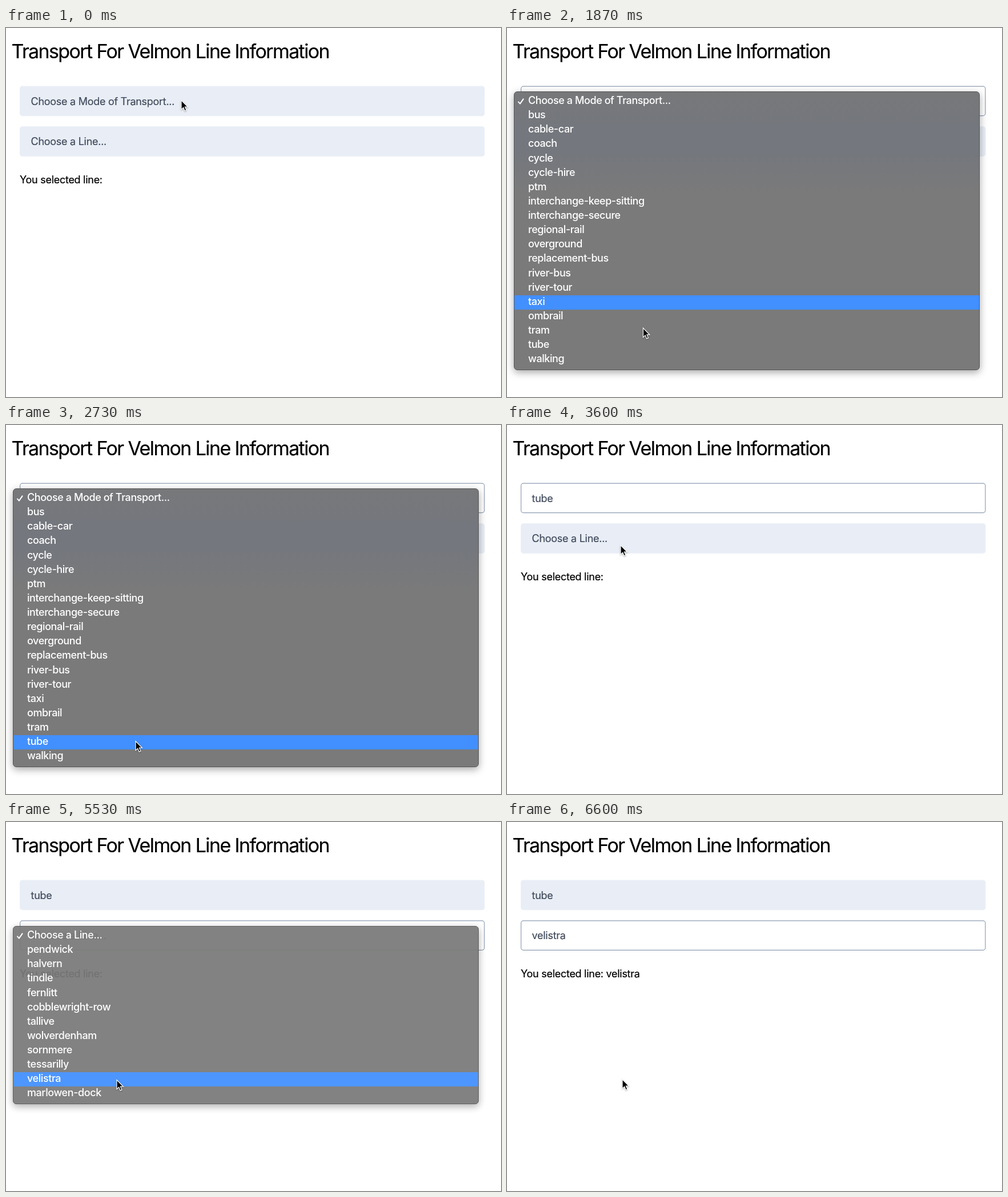
These frames come from a looping animation (867 by 646 pixels, 6670 ms). An HTML page:

```html
<!DOCTYPE html>
<html lang="en">
<head>
<meta charset="utf-8">
<title>Line Information</title>
<style>
  html, body { margin: 0; width: 100%; height: 100%; overflow: hidden; background: #fff; }
  body {
    position: relative;
    font: 400 18px Inter, Roboto, sans-serif;
    font-optical-sizing: none;
    letter-spacing: -.28px;
    -webkit-text-stroke: .2px;
    color: #000;
  }
  h1, p, .field, .menu, #boxes, #cursor { position: absolute; margin: 0; box-sizing: border-box; white-space: pre; }
  h1 { left: 9.5px; top: 21px; font-size: 34px; line-height: 40px; font-weight: 400; letter-spacing: -1.62px; }
  p { left: 24px; top: 254px; line-height: 24px; }
  #boxes { left: 0; top: 0; }
  #boxes rect { fill: #e9eef6; stroke: #e9eef6; stroke-width: 1.17; }
  #boxes .focus { fill: #fff; stroke: #8f9db3; }
  .field { left: 43.6px; line-height: 53px; color: #414a5c; }
  #mode { top: 101.5px; }
  #line { top: 172.3px; }
  .menu {
    left: 12px; width: 816px; padding: 4px 0;
    border: 1px solid #555; border-radius: 6px;
    box-shadow: 0 4px 14px rgba(0, 0, 0, .35);
    background: #7a7a7a; color: #fff; font-weight: 500; letter-spacing: -.43px;
    -webkit-text-stroke: 0;
  }
  #modes { top: 111px; height: 488px; background: linear-gradient(#77787a, #74777d 60px, #74777d 105px, #7a7a7a 180px); }
  #lines { top: 182px; height: 311.5px; }
  .row { height: 25.13px; line-height: 22.7px; padding-left: 24px; }
  .row.on { background: #428fff; }
  .menu svg { position: absolute; left: 5px; top: 10px; }
  #cursor { left: 0; top: 0; overflow: visible; filter: drop-shadow(0 1px 1px rgba(0, 0, 0, .35)); }
</style>
</head>
<body>
<h1>Transport For Velmon Line Information</h1>
<svg id="boxes" width="867" height="300">
  <rect id="modeBox" x="24.6" y="102.2" width="813.2" height="51.4" rx="4"/>
  <rect id="lineBox" x="24.6" y="172.9" width="813.2" height="51.4" rx="4"/>
</svg>
<div class="field" id="mode"></div>
<div class="field" id="line"></div>
<p id="result"></p>
<div class="menu" id="modes"></div>
<div class="menu" id="lines"></div>
<svg id="cursor" width="14" height="21">
  <path d="M0 .5V16.7L3.7 13.3L6.2 19.1L8.9 17.9L6.5 12.2H11.4Z" fill="#000" stroke="#fff" stroke-width="1.2"/>
</svg>
<script>
const LOOP = 6670, STEP = LOOP / 100, ROW = 25.13;
const $ = id => document.getElementById(id);
const MODE_HINT = 'Choose a Mode of Transport...', LINE_HINT = 'Choose a Line...';
const modes = [MODE_HINT, ...('bus cable-car coach cycle cycle-hire ptm interchange-keep-sitting ' +
  'interchange-secure regional-rail overground replacement-bus river-bus river-tour ' +
  'taxi ombrail tram tube walking').split(' ')];
const lines = [LINE_HINT, ...('pendwick halvern tindle fernlitt cobblewright-row tallive ' +
  'wolverdenham sornmere tessarilly velistra marlowen-dock').split(' ')];

const smooth = k => k * k * (3 - 2 * k);
const easeOut = k => 1 - (1 - k) * (1 - k);
const clamp = k => Math.max(0, Math.min(1, k));

// time, x, y, easing towards this point
const path = [
  [0, 307, 126], [1370, 307, 126], [1930, 236, 539], [2000, 236, 539],
  [2470, 227, 553], [3070, 227, 553], [3600, 199, 210], [4130, 199, 210],
  [4470, 201, 402, easeOut], [4730, 194, 450, easeOut], [4800, 194, 450],
  [4870, 194, 451], [6330, 194, 451], [6600, 202, 450], [LOOP, 202, 450]
];

function pointer(t) {
  const i = Math.max(1, path.findIndex(p => p[0] >= t));
  const [t0, x0, y0] = path[i - 1], [t1, x1, y1, ease = smooth] = path[i];
  const k = ease(clamp((t - t0) / (t1 - t0)));
  return [x0 + (x1 - x0) * k, y0 + (y1 - y0) * k];
}

function makeMenu(id, items, top, open, click) {
  const el = $(id);
  const tick = '<svg width="14" height="14"><path d="M2 7.4L4.9 10.6L10.6 2.4" fill="none" ' +
    'stroke="#fff" stroke-width="2" stroke-linecap="round" stroke-linejoin="round"/></svg>';
  el.innerHTML = tick + items.map(s => `<div class="row">${s}</div>`).join('');
  const rows = [...el.querySelectorAll('.row')];
  const fade = click + 190, closed = fade + 250;
  return {
    open, closed,
    draw(t) {
      const shown = t >= open && t < closed;
      el.style.display = shown ? 'block' : 'none';
      if (!shown) return;
      el.style.opacity = 1 - clamp((t - fade) / 250);
      // the highlight trails the pointer by one step and blinks once on click
      const y = pointer(Math.min(t - STEP, click))[1];
      const blink = t >= click && t < click + 70;
      const active = blink ? -1 : Math.floor((y - top) / ROW);
      rows.forEach((r, i) => r.classList.toggle('on', i === active));
    }
  };
}

const modeMenu = makeMenu('modes', modes, 116, 790, 2660);
const lineMenu = makeMenu('lines', lines, 187, 3725, 5330);

function draw(t) {
  const modeSet = t >= modeMenu.closed, lineSet = t >= lineMenu.closed;
  $('mode').textContent = modeSet ? 'tube' : MODE_HINT;
  $('line').textContent = lineSet ? 'velistra' : LINE_HINT;
  $('result').textContent = 'You selected line:' + (lineSet ? ' velistra' : '');
  $('modeBox').classList.toggle('focus', t >= modeMenu.open && t < lineMenu.open);
  $('lineBox').classList.toggle('focus', t >= lineMenu.open);
  modeMenu.draw(t);
  lineMenu.draw(t);
  const [x, y] = pointer(t);
  $('cursor').style.transform = `translate(${x}px, ${y}px)`;
}

// the picture advances in even steps of about 15 per second
function tick() {
  draw(Math.floor((performance.now() % LOOP) / STEP + .12) * STEP);
  requestAnimationFrame(tick);
}
tick();
</script>
</body>
</html>
```
